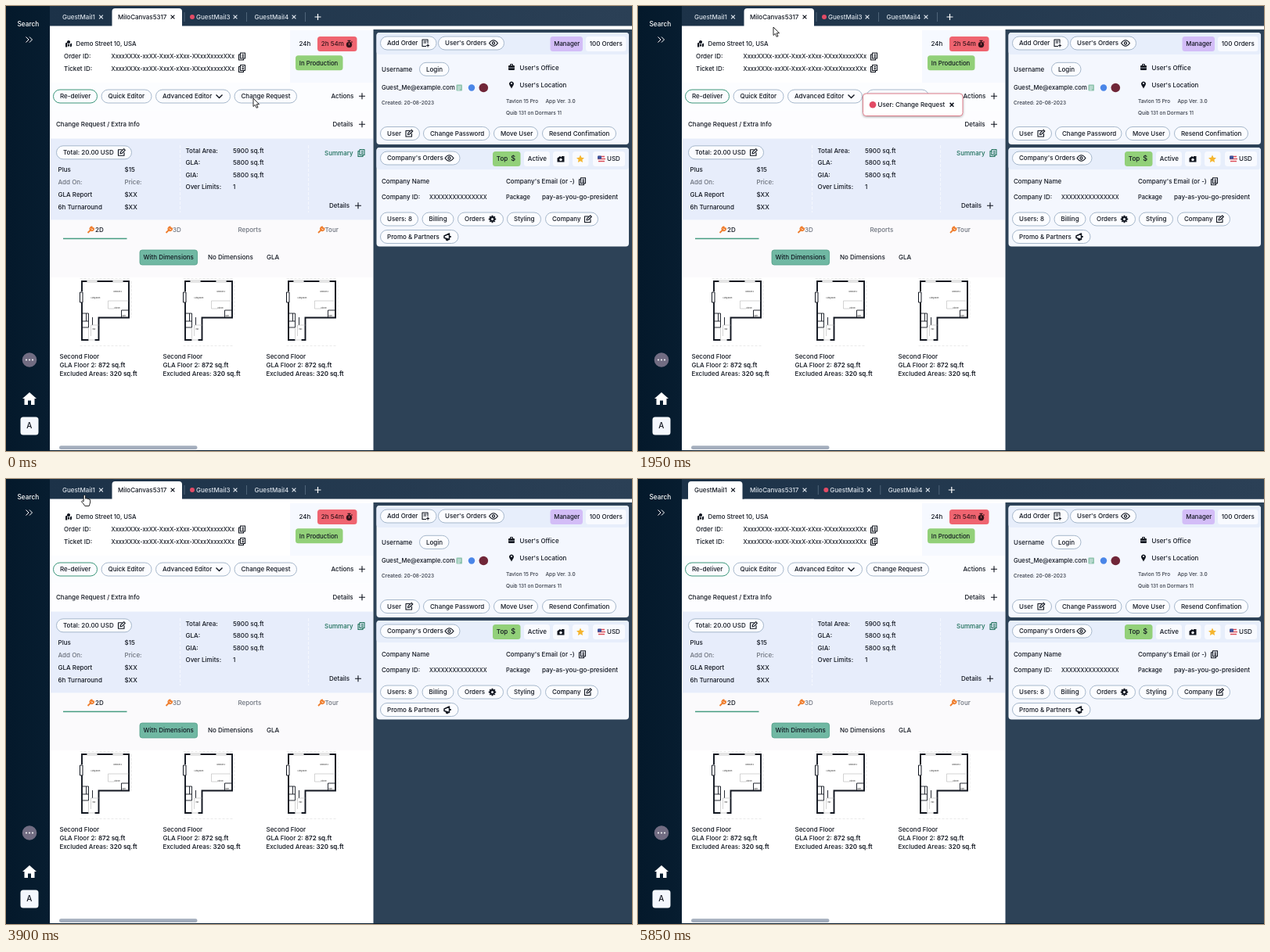
Animation, 800 px wide and 569 px high, one loop 6000 ms. Source, as an HTML page:

```html
<!DOCTYPE html>
<html lang="en">
<head>
<meta charset="utf-8">
<style>
html, body { margin: 0; width: 100%; height: 100%; overflow: hidden; background: #2d4257; }
svg { display: block; width: 100%; height: 100%; }
text { font-family: Inter, "Open Sans", sans-serif; font-weight: 500; }
</style>
</head>
<body>
<svg id="stage" viewBox="0 0 800 569"></svg>
<script>
const INK = '#10151f', GREY = '#6b717c', LIGHT = '#dde4ec';
const GREEN = '#92d079', RED = '#e24b65';

const rect = (x, y, w, h, fill, r = 0, extra = '') =>
  `<rect x="${x}" y="${y}" width="${w}" height="${h}" rx="${r}" fill="${fill}" ${extra}/>`;
const circle = (x, y, r, fill) => `<circle cx="${x}" cy="${y}" r="${r}" fill="${fill}"/>`;
const line = (d, color = INK, width = 1, extra = '') =>
  `<path d="${d}" fill="none" stroke="${color}" stroke-width="${width}" ${extra}/>`;
// y is the vertical middle of the line of text
const text = (x, y, s, { size = 8, color = INK, weight = 500 } = {}) =>
  `<text x="${x}" y="${y + 2.9}" font-size="${size}" fill="${color}" font-weight="${weight}">${s}</text>`;
const bold = (x, y, s, o) => text(x, y, s, { weight: 600, ...o });
const pill = (x, y, w, s, border = '#9db0c6', weight = 500) =>
  rect(x + .5, y + .5, w - 1, 17, '#fbfcff', 8.5, `stroke="${border}" stroke-width=".9"`) +
  text(x + 9, y + 8.8, s, { weight });
const chip = (x, y, w, fill, s = '', o) => rect(x, y, w, 19, fill, 3.5) + text(x + 4.8, y + 9.5, s, o);

const paths = {
  plus: 'M-4 0H4M0-4V4',
  close: 'M-2.4-2.4L2.4 2.4M2.4-2.4L-2.4 2.4',
  chevron: 'M-4-2L0 2L4-2',
  copy: 'M-2-4.5H4V2.5H-2ZM-2-2.5H-4V4.5H2V2.5M0-2.5H2.5M0-.8H2.5M0 .8H2.5',
  edit: 'M1-3.5H-4V4H3.5V0M-1.5 1.5L-1-.7L3.2-4.7L4.8-3L.7 1Z',
  eye: 'M-5.5 0Q0-7.4 5.5 0Q0 7.4-5.5 0ZM-1.6 0a1.6 1.6 0 1 0 3.2 0a1.6 1.6 0 1 0-3.2 0',
  addDoc: 'M1 4H-4V-4.5H3V0M-2.2-2.5H1.4M-2.2-.5H1M1.2 3H5M3.1 1V5',
  wrench: 'M-3.5 3.5L1.2-1.2M4-2.4A2.4 2.4 0 1 1 1.8-4L1.8-2.2Z',
  gear: 'M-2.5 0A2.5 2.5 0 1 0 2.5 0A2.5 2.5 0 1 0-2.5 0M0-4.7V-3M0 4.7V3M-4.7 0H-3M4.7 0H3M-3.3-3.3L-2-2M3.3 3.3L2 2M3.3-3.3L2-2M-3.3 3.3L-2 2',
  horn: 'M-4-1L2.5-4V3.5L-4 1.5ZM-2 2L-1 4.5H.7L0 2.5M4-1V1'
};
const icon = (x, y, name, color = INK, width = 1.1) =>
  line(paths[name], color, width, `transform="translate(${x} ${y})" stroke-linejoin="round"`);
const shape = (x, y, d, fill = INK) => `<path d="${d}" fill="${fill}" transform="translate(${x} ${y})"/>`;

function sidebar() {
  return rect(0, 0, 56, 569, 'url(#side)') +
    bold(14.5, 23, 'Search', { color: '#fff', size: 8.3 }) +
    line('M25.5 39.5L29 43L25.5 46.5M30 39.5L33.5 43L30 46.5', '#fff') +
    circle(30, 452.5, 9.3, '#716c82') + [26, 30, 34].map(x => circle(x, 452.5, 1.1, '#fff')).join('') +
    shape(30, 502, 'M0-8L9 0H6.5V8H2V2.5H-2V8H-6.5V0H-9Z', '#fff') +
    rect(18.5, 525.5, 23, 23, '#f4f7fd', 3.5) + bold(26.3, 537, 'A', { size: 10 });
}

// shift moves the tabs that follow the second one
function tabBar(active, shift) {
  const tab = (i, x, s, closeX) => {
    const color = i === active ? INK : LIGHT;
    return text(x, 14, s, { color }) + icon(closeX, 14, 'close', color, 1.2);
  };
  const [x, w] = active ? [135.5, 89.5] : [64, 69.5];
  return rect(56, 0, 744, 25.5, 'url(#bar)') +
    `<path d="M${x} 26V7q0-4 4-4h${w - 8}q4 0 4 4V26Z" fill="#fff"/>` +
    tab(0, 72, 'GuestMail1', 121.5) + tab(1, 143, 'MiloCanvas5317', 213) +
    circle(238 + shift, 14, 3, RED) + tab(2, 243 + shift, 'GuestMail3', 293 + shift) +
    tab(3, 317.5 + shift, 'GuestMail4', 368 + shift) +
    [228, 307.5, 382.5].map(s => line(`M${s + shift} 8V20`, '#5b7085', .8)).join('') +
    icon(398.5 + shift, 14, 'plus', '#fff', 1.2);
}

function plan(x) {
  const label = (tx, ty, s) => text(tx, ty, s, { size: 2, color: '#333' });
  return `<g transform="translate(${x} 0)">` +
    line('M28.5 365V352H35M48 352H68M81 352H88.5V398.5H50V427H45M28.5 379V427H37', INK, 1.9) +
    line('M35 351H48M35 353H48M68 351H81M68 353H81', '#aaa', .6) +
    line('M26 366H29.5V379H26Z', INK, 1) +
    line('M28.5 393H37V403H28.5M34 393V403M37 403V411H28.5M79 398V389H88M42 398V408', INK, .9) +
    line('M62 387V377H88M62 387H70M37 411V427M40 408H50M40 408V422M37 427H45', '#b5b5b5', .6) +
    line('M26 434.5H89M26 348.5H89M91.5 352V398', '#c9c9c9', .4, 'stroke-dasharray="3 2"') +
    label(40, 371, 'Living Room') + label(69, 363, 'Bedroom 2') + label(70, 384, 'Kitchen') +
    label(80, 394, 'Bath') + label(42, 411, 'Hall') + '</g>';
}

function orderPanel() {
  const code = 'XxxxXXXx-xxXX-XxxX-xXxx-XXxxXxxxxXXx';
  const grey = { color: GREY };
  let out = rect(56, 25, 744, 5, '#fff') + rect(56, 29, 413.5, 539, '#fff') +
    rect(363, 31, 106, 67, '#f6f9ff') + rect(57, 98, 412, 35.5, '#fcfdff') + rect(57, 134, 412, 35, '#fdfdff') +
    rect(57, 169.5, 412, 104, '#e7edfb') + rect(57, 274, 412, 73, '#fbfafc');

  out += shape(80, 48.5, 'M-4 4V-1L-1.7-2V4ZM-1-1V3H1.2V0ZM2 4V0L4-1V3ZM0-4.5A2 2 0 0 1 2-2L0 1L-2-2A2 2 0 0 1 0-4.5') +
    bold(89.5, 48.5, 'Demo Street 10, USA', { size: 7.8 });
  [['Order ID:', 64.5], ['Ticket ID:', 80]].forEach(([s, y]) => {
    out += text(74, y, s) + text(134.5, y, code, { size: 7.35 }) + icon(301.5, y, 'copy');
  });
  out += text(374.5, 48.5, '24h') +
    chip(398, 39, 50.5, '#ef6470', '2h 54m', { weight: 600, color: '#35141a' }) +
    circle(438.5, 49.5, 3.7, '#35141a') + line('M436.5 44.3H440.5M438.5 44V46M441.5 45.5L442.5 46.5M438.5 47.5V50', '#35141a', 1.2) +
    line('M438.5 47.3V50', '#ef6470', .8) +
    chip(370, 63.3, 60.5, GREEN, 'In Production', { size: 7.8 });

  out += pill(60, 106.5, 57, 'Re-deliver', '#268c6c', 600) + pill(121.5, 106.5, 65, 'Quick Editor') +
    pill(191, 106.5, 96, 'Advanced Editor') + icon(272.5, 115.5, 'chevron', INK, 1.4) +
    pill(291.5, 106.5, 80.5, 'Change Request', '#9db0c6') +
    text(415.5, 115.3, 'Actions') + icon(455, 115.3, 'plus') +
    text(64, 151.3, 'Change Request / Extra Info') +
    text(417.5, 151.3, 'Details') + icon(455, 151.3, 'plus');

  out += pill(64, 178.3, 97, 'Total: 20.00 USD') + icon(147.5, 187.3, 'edit') +
    [['Plus', '$15'], ['Add On:', 'Price:', grey], ['GLA Report', '$XX'], ['6h Turnaround', '$XX']]
      .map(([a, b, o], i) => text(66.5, 209 + i * 15.9, a, o) + text(151.5, 209 + i * 15.9, b, o)).join('') +
    [['Total Area:', '5900 sq.ft'], ['GLA:', '5800 sq.ft'], ['GIA:', '5800 sq.ft'], ['Over Limits:', '1']]
      .map(([a, b], i) => text(229.5, 184.8 + i * 15.5, a) + bold(290, 184.8 + i * 15.5, b)).join('') +
    line('M222.5 178V264M386.5 178V264', '#f4f7fe', 1, 'stroke-dasharray="4 2"') +
    text(407, 188, 'Summary', { color: '#1d6f59' }) + icon(454, 188, 'copy', '#1d6f59') +
    text(413, 255.2, 'Details') + icon(450, 255.2, 'plus');

  out += text(114, 286.5, '2D') + text(213, 286.5, '3D', grey) +
    text(296.5, 286.5, 'Reports', grey) + text(407.5, 286.5, 'Tour', grey) +
    [108, 208, 402.5].map(x => icon(x, 286.5, 'wrench', '#ef7d2d', 1.8)).join('') +
    rect(73, 296.7, 81.5, 1.5, '#459b80') +
    rect(171, 312, 73.5, 19, '#70b8a3', 3, 'stroke="#4f9d86" stroke-width=".8"') + text(175.5, 321.5, 'With Dimensions') +
    text(258, 321.5, 'No Dimensions') + text(333, 321.5, 'GLA');

  for (const x of [68.5, 200.5, 332.5]) {
    const pair = (y, a, b) => text(x, y, `${a} <tspan font-weight="600">${b}</tspan>`);
    out += plan(x) + bold(x, 448, 'Second Floor') +
      pair(459, 'GLA Floor 2:', '872 sq.ft') + pair(470, 'Excluded Areas:', '320 sq.ft');
  }
  return out + rect(68, 562.3, 176.5, 4.7, '#a4aebd', 2.3);
}

function userCard() {
  const small = { size: 6.5, color: '#343a45' };
  return rect(473.5, 34, 322.5, 143, '#f4f7fe', 4) + rect(473.5, 34, 322.5, 28, '#e7eefb', 4) +
    pill(478, 38.5, 72.5, 'Add Order') + icon(536, 47.5, 'addDoc') +
    pill(552, 38.5, 85, "User's Orders") + icon(623, 47.5, 'eye') +
    chip(695.5, 39, 41.5, '#d3bdf7', 'Manager', { size: 7.8 }) + chip(741, 39, 51.5, '#f8faff', '100 Orders') +
    text(480, 81.2, 'Username') + pill(528, 71.8, 38.5, 'Login') +
    text(480, 104.5, 'Guest_Me@example.com', { size: 7.7 }) +
    rect(575.5, 100.5, 7.5, 8, '#8fc4ae', 1) + line('M577 103H581.5M577 105H581.5M577 107H580', '#f4f7fe', .8) +
    circle(595, 104.5, 4.2, '#4a86e8') + circle(610.3, 104.5, 5.8, '#702638') +
    text(480, 123.3, 'Created: 20-08-2023', small) +
    rect(642, 76, 8, 6, INK, 1) + line('M644.5 76V74.5H647.5V76', INK, 1) + line('M642 79H650', '#f4f7fe', .6) +
    text(656.5, 78.7, "User's Office") +
    shape(646, 101, 'M0 4.5L-2.6 0A3 3 0 1 1 2.6 0Z') + circle(646, 99, 1, '#f4f7fe') +
    text(656.5, 101, "User's Location") +
    text(639, 121, 'Tavlon 15 Pro', small) + text(689.5, 121, 'App Ver. 3.0', small) +
    text(639, 136.2, 'Quib 131 on Dormars 11', small) +
    pill(478, 154, 51, 'User') + icon(515, 163, 'edit') + pill(533, 154, 85.5, 'Change Password') +
    pill(623, 154, 57, 'Move User') + pill(685, 154, 95, 'Resend Confimation');
}

function companyCard() {
  const flag = rect(756, 190.5, 10, 10, '#fff', 5) +
    line('M757 192.5H765M756 195.5H766M757 198.5H765', '#d94b58', 1.3) + rect(756, 191.5, 5, 4.2, '#3b549c', 1);
  return rect(473.5, 181, 322.5, 126.5, '#f4f7fe', 4) + rect(473.5, 181, 322.5, 28, '#e7eefb', 4) +
    pill(478, 185.5, 102.5, "Company's Orders") + icon(566.5, 194.5, 'eye') +
    chip(622, 186, 35.5, GREEN, 'Top') + bold(645.3, 195.5, '$', { size: 9 }) +
    chip(662, 186, 33, '#f8faff', 'Active') + chip(699, 186, 20.5, '#f8faff') + chip(724, 186, 20.5, '#f8faff') +
    shape(709, 195.5, 'M-4.5 4V-1L-1-3.5L1-2V-3.5H4.5V4Z') + circle(1 + 708, 196.5, 1.7, '#f8faff') +
    shape(734, 195.5, 'M0-5L1.5-1.7L5-1.3L2.4 1L3.1 4.5L0 2.8L-3.1 4.5L-2.4 1L-5-1.3L-1.5-1.7Z', '#f5b52e') +
    chip(750, 186, 41, '#f8faff') + flag + bold(768, 195.5, 'USD') +
    text(480, 224.3, 'Company Name') + text(639, 224.3, "Company's Email (or -)") + icon(736.5, 224.3, 'copy') +
    text(480, 244.3, 'Company ID:') + text(541, 244.3, 'X'.repeat(15), { size: 7 }) +
    text(639, 244.3, 'Package', { size: 7.5 }) + text(685, 244.3, 'pay-as-you-go-president') +
    pill(478, 263.5, 49, 'Users: 8') + pill(531.5, 263.5, 41, 'Billing') +
    pill(577, 263.5, 59, 'Orders') + icon(621.5, 272.5, 'gear', INK, 2) + pill(640, 263.5, 44, 'Styling') +
    pill(689, 263.5, 68, 'Company') + icon(743.5, 272.5, 'edit') +
    pill(478, 286, 100.5, 'Promo &amp; Partners') + icon(564, 295, 'horn', INK, 1.5);
}

const toast = rect(287.5, 112, 127.5, 28.5, '#fff', 4, 'stroke="#dd7f8c" stroke-width="1" filter="url(#shadow)"') +
  circle(300, 126.3, 4.3, RED) + text(306.5, 126.3, 'User: Change Request') + icon(401, 126.3, 'close', INK, 1.5);
const tooltip = rect(241, 11, 157, 56, '#fff', 4, 'filter="url(#shadow)"') +
  bold(250.5, 25.3, 'Process Completed') +
  text(250.5, 41, "The process: 'Process Name' is", { size: 8.1 }) + text(250.5, 51.8, 'complete.', { size: 8.1 });
const outline = 'fill="#fff" stroke="#111" stroke-width=".9" stroke-linejoin="round"';
const arrow = `<path ${outline} d="M0 0V10.5L2.4 8.3L4.2 12.3L6 11.5L4.2 7.7H7.5Z"/>`;
const hand = `<path ${outline} d="M1.2 1.2Q2.4-.4 3.5 1.2V5.2Q4.8 4 5.8 5.4Q7 4.4 8 6Q9.4 5.4 9.6 7.2V10Q9 12 8.2 14.5H2.8Q1.6 12-1.6 8.8Q-1 7 1.2 8.6Z"/>`;
const gradient = (id, a, b) =>
  `<linearGradient id="${id}"><stop stop-color="${a}"/><stop offset="1" stop-color="${b}"/></linearGradient>`;

const group = (id, content) => `<g id="${id}">${content}</g>`;
document.getElementById('stage').innerHTML =
  `<defs>${gradient('side', '#04192b', '#071d30')}${gradient('bar', '#1c3248', '#2b4056')}
   <filter id="shadow" x="-10%" y="-20%" width="120%" height="150%"><feDropShadow dx="0" dy="1" stdDeviation="1.5" flood-opacity=".35"/></filter></defs>` +
  rect(0, 0, 800, 569, '#2d4257') + orderPanel() + userCard() + companyCard() + rect(0, 568, 800, 1, '#071d30') +
  sidebar() + group('secondTab', tabBar(1, 0)) + group('firstTab', tabBar(0, 2.3)) +
  group('toast', toast) + group('tooltip', tooltip) +
  group('cursor', group('arrow', arrow) + group('hand', hand));

const el = Object.fromEntries(['firstTab', 'toast', 'tooltip', 'cursor', 'arrow', 'hand']
  .map(id => [id, document.getElementById(id)]));

// time, x, y of the pointer tip
const route = [
  [0, 316, 118], [300, 316, 118], [900, 107, 19], [1200, 107, 19], [1500, 173, 20], [1800, 173, 20],
  [1950, 173, 27], [2550, 352, 127], [2850, 399, 126], [3150, 399, 126], [3750, 98, 20],
  [4050, 98, 20], [4650, 240, 11], [5400, 240, 11], [5700, 240, -20], [6000, 240, -20]
];
const clamp = v => Math.min(1, Math.max(0, v));
const ramp = (t, from, to) => clamp((t - from) / (to - from));
const ease = p => p * p * (3 - 2 * p);

function pointer(t) {
  const i = route.findIndex(k => k[0] > t);
  const [t0, x0, y0] = route[i - 1], [t1, x1, y1] = route[i];
  const p = ease((t - t0) / (t1 - t0));
  return [x0 + (x1 - x0) * p, y0 + (y1 - y0) * p];
}

function draw(now) {
  const t = now % 6000;
  el.firstTab.style.opacity = ramp(t, 900, 1200) - ramp(t, 1650, 1800) + ramp(t, 4050, 4200);
  el.toast.style.opacity = ramp(t, 1750, 1900) - ramp(t, 3050, 3200);
  el.tooltip.style.opacity = ramp(t, 4600, 4750) - ramp(t, 5400, 5550);
  const onTab = t > 3700 && t < 4200;
  el.hand.style.display = onTab ? '' : 'none';
  el.arrow.style.display = onTab ? 'none' : '';
  el.cursor.setAttribute('transform', `translate(${pointer(t).join(' ')})`);
  requestAnimationFrame(draw);
}
requestAnimationFrame(draw);
</script>
</body>
</html>
```
